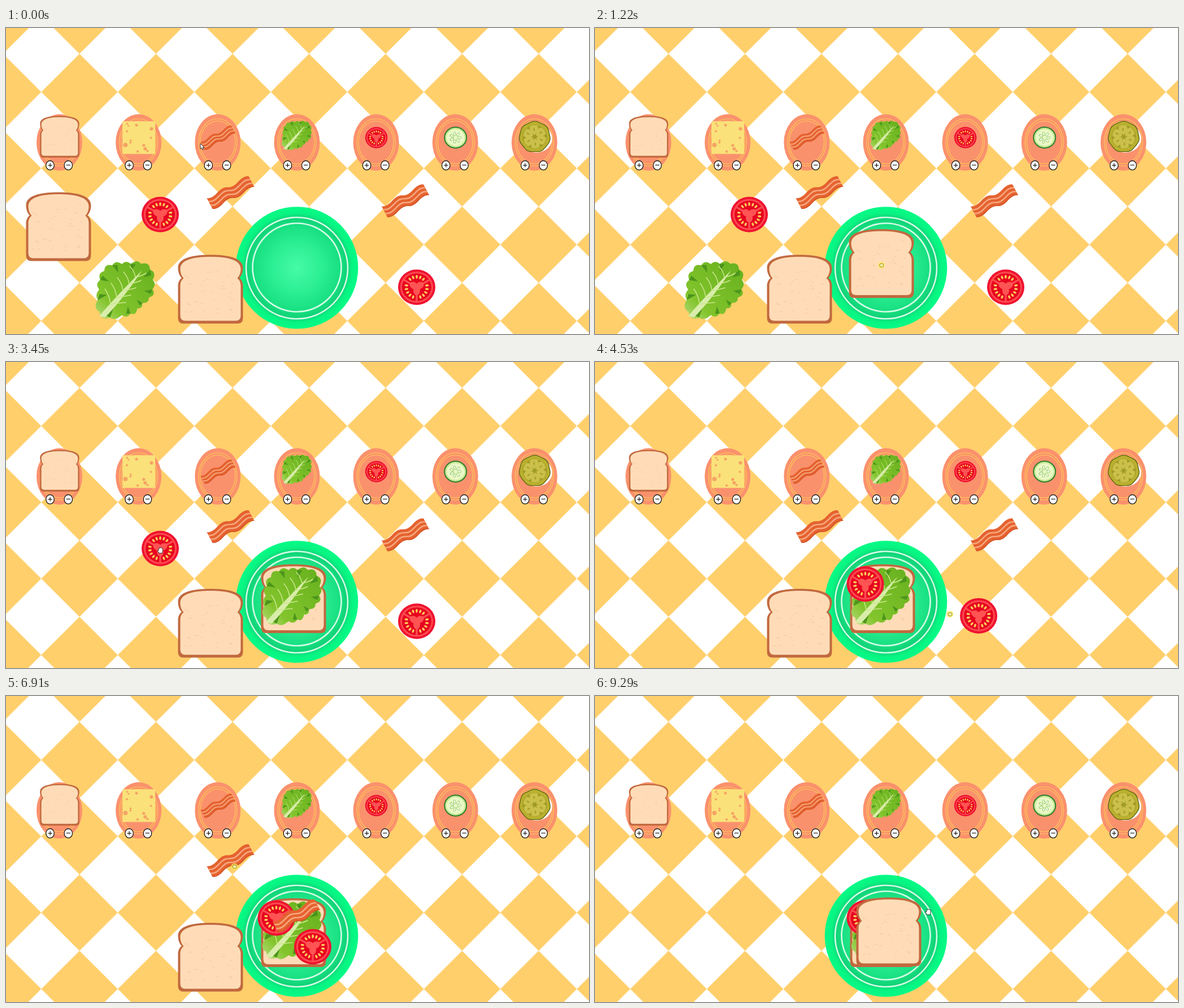
An HTML page for the animation above (9.49 s loop, 1032 by 543 pixels).

```html
<!DOCTYPE html>
<html lang="en">
<head>
<meta charset="utf-8">
<title>Build a sandwich</title>
<style>
html, body { margin: 0; height: 100%; overflow: hidden; background: #fff; }
svg { display: block; width: 100%; height: 100%; }
text { font: 15px "Liberation Sans", Arial, sans-serif; text-anchor: middle; }
</style>
</head>
<body>
<svg viewBox="0 0 1032 543">
  <defs>
    <pattern id="tiles" x="62.4" y="45.8" width="135.45" height="135.45" patternUnits="userSpaceOnUse">
      <path d="M67.725 0L135.45 67.725L67.725 135.45L0 67.725Z" fill="#ffcf6b"/>
    </pattern>
    <radialGradient id="glaze">
      <stop offset="0" stop-color="#46fba6"/>
      <stop offset=".45" stop-color="#29ed91"/>
      <stop offset=".72" stop-color="#17df80"/>
      <stop offset=".82" stop-color="#10d277"/>
      <stop offset=".9" stop-color="#08f482"/>
      <stop offset="1" stop-color="#06fb86"/>
    </radialGradient>
    <linearGradient id="leaf" x1="0" y1="1" x2="1" y2="0">
      <stop offset="0" stop-color="#b5dc7c"/>
      <stop offset=".25" stop-color="#82c42c"/>
      <stop offset="1" stop-color="#66b01e"/>
    </linearGradient>
    <g id="bread"></g>
    <g id="cheese"></g>
    <g id="bacon"></g>
    <g id="lettuce"></g>
    <g id="tomato"></g>
    <g id="cucumber"></g>
    <g id="pickle"></g>
  </defs>
  <rect width="1032" height="543" fill="url(#tiles)"/>
  <g id="tray"></g>
  <g fill="none" stroke="#d3fbe6" stroke-width="2.6">
    <circle cx="515" cy="425.5" r="108.3" fill="url(#glaze)" stroke="none"/>
    <circle cx="515" cy="426" r="90"/>
    <circle cx="515" cy="425" r="78.5"/>
  </g>
  <g id="food"></g>
  <g id="cursor">
    <path id="arrow" d="M0 0V9.5L2.3 7.5L4 11L5.6 10.2L4 7H7Z" fill="#fff" stroke="#222" stroke-width=".9"/>
    <path id="hand" d="M-2.5 5L-5 1Q-5-1-3 0L-3.5-3Q-2.5-4.5-1.5-3Q-1-5.5.5-4.5Q2-5.5 2.5-3.5Q4.5-4 4.3-1L3.5 5Z" fill="#fff" stroke="#222" stroke-width=".9"/>
    <g id="fist">
      <circle r="6" fill="#ffee58" opacity=".75"/>
      <rect x="-3" y="-2.7" width="6.5" height="5.6" rx="2" fill="#fff8b0" stroke="#8d7c1c"/>
    </g>
  </g>
</svg>
<script>
const $ = id => document.getElementById(id);
const { PI, sin, cos, abs, min, max, floor, hypot } = Math;
const range = (n, f) => Array.from({ length: n }, (_, i) => f(i));
const repeat = (n, f) => range(n, f).join('');
const polygon = (points, attrs) => `<polygon points="${points.map(p => p.map(v => v.toFixed(1)))}" ${attrs}/>`;
const ellipse = (x, y, rx, ry, attrs) => `<ellipse cx="${x}" cy="${y}" rx="${rx}" ry="${ry}" ${attrs}/>`;
const path = (d, attrs) => `<path d="${d}" ${attrs}/>`;
const line = (d, color, width) => path(d, `fill="none" stroke="${color}" stroke-width="${width}" stroke-linecap="round"`);
const turned = (deg, body) => `<g transform="rotate(${deg})">${body}</g>`;

let seed = 7;
const rnd = (a, b) => {
  seed = seed * 16807 % 2147483647;
  return a + (b - a) * seed / 2147483647;
};

// Bread: the crumb is the crust outline, slightly smaller
const slice = 'M-51-20C-55-24-57.5-30-57.5-38C-57.5-56-30-61 0-61S57.5-56 57.5-38C57.5-30 55-24 51-20' +
  'C55-17 57.5-12 57.5-6V51Q57.5 61 48 61H-48Q-57.5 61-57.5 51V-6C-57.5-12-55-17-51-20Z';
$('bread').innerHTML = path(slice, 'fill="#c1693f"') +
  path(slice, 'fill="#ffdcb7" transform="translate(0 -.8) scale(.93)"') +
  repeat(34, () => line(`M${rnd(-46, 44)} ${rnd(-46, 48)}q${rnd(-1, 3)} ${rnd(-3, 1)} ${rnd(2, 5)} ${rnd(-2, 3)}`, '#f3c79b', 1));

$('cheese').innerHTML = '<rect x="-29" y="-29" width="58" height="58" fill="#fae179"/>' +
  repeat(13, () => {
    const r = rnd(1.5, 4);
    return ellipse(rnd(-25, 25), rnd(-25, 25), r, r, 'fill="#f4a365"');
  });

// Bacon: one wavy edge, moved across the strip by k
const wave = k => range(25, i => {
  const u = i / 24;
  return [-42 + 74 * u + 10 * k, 10 - 39 * u + 3 * sin(4 * PI * u) + 19 * k];
});
const rasher = (a, b, color) => polygon([...wave(a), ...wave(b).reverse()], `fill="${color}"`);
$('bacon').innerHTML = rasher(0, 1, '#e5622f') +
  rasher(.25, .38, '#f7a67d') + rasher(.6, .73, '#f7a67d') + rasher(.94, 1, '#cf4f24');

// Lettuce: eight radii, blended around the leaf, with a ruffled rim
const reach = [50, 41, 48, 66, 52, 55, 49, 59];
const rim = a => {
  const k = a / PI * 4, i = floor(k), s = (1 - cos(PI * (k - i))) / 2;
  return reach[i % 8] * (1 - s) + reach[(i + 1) % 8] * s - 4 + 4 * abs(sin(9 * a));
};
const leafPoint = (a, k = 1) => [rim(a) * k * cos(a), rim(a) * k * sin(a)];
$('lettuce').innerHTML =
  polygon(range(180, i => leafPoint(i * PI / 90)), 'fill="url(#leaf)"') +
  repeat(9, i => {
    const a = (i * 2 + 10) * PI / 9 % (2 * PI);
    return polygon([leafPoint(a), leafPoint(a + .18, .9), leafPoint(a + .08, .65)], 'fill="#4c951c"');
  }) +
  path('M-48 47Q-18 12 28-34Q-6 17-38 50Z', 'fill="#d9edaa"') +
  repeat(5, i => {
    const x = -28 + 11 * i, y = 26 - 12 * i, len = 27 - 2 * i;
    return line(`M${x} ${y}q-2 ${-len * .6}-10 ${-len}M${x} ${y}q${len * .6}-2 ${len} ${-3 - i}`, '#cbe78d', 1.5);
  });

$('tomato').innerHTML =
  ellipse(0, 0, 33, 31.5, 'fill="#ef1230"') +
  ellipse(0, 0, 29, 27.5, 'fill="#ff4a50"') +
  ellipse(0, 0, 26, 24.5, 'fill="#e7051f"') +
  repeat(3, i => turned(90 + 120 * i, line('M0 0H25', '#ff4a50', 3.5) + ellipse(6, 0, 8, 6, 'fill="#ff5453"')) +
    repeat(5, j => turned(-90 + 120 * i + 20 * (j - 2), ellipse(18.5, 0, 3.2, 1.8, 'fill="#fbc95e"'))));

$('cucumber').innerHTML =
  ellipse(0, 0, 19.5, 18.5, 'fill="#c4e98f" stroke="#2f7d33" stroke-width="2"') +
  ellipse(0, 0, 16, 15, 'fill="#eaf8c8"') +
  repeat(7, i => turned(i * 360 / 7, ellipse(7, 0, 3.4, 1.7, 'fill="#fff" stroke="#86c552" stroke-width=".9"')));

$('pickle').innerHTML =
  ellipse(3, 3, 28, 25, 'fill="#fff"') +
  polygon(range(72, i => {
    const a = i * PI / 36, r = 27 + .6 * sin(7 * a);
    return [r * cos(a), r * sin(a)];
  }), 'fill="#b9b02f" stroke="#626713" stroke-width="1.4"') +
  ellipse(0, 0, 21.5, 20.5, 'fill="#a09b26"') +
  repeat(6, i => turned(i * 60 + 25,
    path('M3 0Q10-10 19-7Q22 0 19 7Q10 10 3 0Z', 'fill="#cbc04a"') + ellipse(13, 0, 3, 1.4, 'fill="#a8a22c"')));

// Tray: name, scale, lift
const samples = [['bread', .605, 10], ['cheese', 1, 8.5], ['bacon', .74, 8.5], ['lettuce', .51, 13],
  ['tomato', .6, 8.5], ['cucumber', 1, 8.5], ['pickle', 1, 10]];
const ring = (rx, ry) => ellipse(0, 0, rx, ry, 'fill="none" stroke="#ffcb58" stroke-width="1.1"');
const button = (x, sign) =>
  ellipse(x, 40.7, 7.2, 8.2, 'fill="#fff" stroke="#111" stroke-width="1.3"') + `<text x="${x}" y="45.4">${sign}</text>`;
$('tray').innerHTML = samples.map(([name, k, lift], i) =>
  `<g transform="translate(${94.5 + 140.15 * i} 203)">` +
  ellipse(0, 0, 40.5, 50, 'fill="#fa916d"') + ring(34, 42) + ring(31, 38) +
  `<use href="#${name}" transform="translate(.5 ${-lift}) scale(${k})"/>` +
  button(-16.5, '+') + button(15.8, '−') + '</g>').join('');

// Name, resting place, then drags: start, end, x, y
const items = [
  ['bread', 93, 352.5, [525, 1150, 507, 418], [1540, 1610, 509, 420]],
  ['lettuce', 213, 464, [2294, 2750, 508, 414.5]],
  ['tomato', 273, 331, [3500, 3930, 478.5, 394]],
  ['tomato', 727, 460, [4338, 4706, 543, 445]],
  ['bacon', 707, 306.5, [5380, 5750, 456, 400], [5840, 6100, 514, 390]],
  ['bacon', 397.5, 292, [6850, 7250, 508, 443]],
  ['bread', 362, 463.5, [7694, 8126, 524, 417.5], [8600, 8700, 520, 418.5]]
].map(([name, x, y, ...drags]) => {
  const el = document.createElementNS('http://www.w3.org/2000/svg', 'use');
  el.setAttribute('href', '#' + name);
  return { el, x, y, drags, grab: drags[0][0], drop: drags.at(-1)[1] };
});

const LOOP = 9490, LAG = 70, GRIP = 3;

// The pointer reaches each piece just before its grab, then carries it
const moves = [];
let free = 140;
for (const { x, y, drags, grab, drop } of items) {
  moves.push([max(free, grab - 460), grab - 40, x, y, 0], ...drags.map(d => [...d, .04]));
  free = drop + 20;
}
moves.push([8870, 9270, 590, 380, 0]);

function pointer(t) {
  let x = 344, y = 205 - GRIP;
  for (const [from, to, tx, ty, lift] of moves) {
    if (t <= from) break;
    const u = min(1, (t - from) / (to - from)), s = u * u * (3 - 2 * u);
    const arc = lift * hypot(tx - x, ty - y) * 4 * s * (1 - s);
    x += (tx - x) * s;
    y += (ty - y) * s - arc;
  }
  return [x, y + GRIP];
}

const place = (el, x, y) => el.setAttribute('transform', `translate(${x.toFixed(2)} ${y.toFixed(2)})`);

function draw(now) {
  const t = now % LOOP, [px, py] = pointer(t);
  let held = false, near = false;
  for (const { el, grab, drop } of items) {
    const [x, y] = pointer(max(grab, min(drop, t - LAG)));
    place(el, x, y - GRIP);
    held ||= t >= grab && t < drop;
    near ||= hypot(px - x, py - y) < 80;
  }
  // Grabbed pieces rise above the ones still waiting
  const order = [...items.filter(i => t < i.grab), ...items.filter(i => t >= i.grab)];
  $('food').append(...order.map(i => i.el));
  place($('cursor'), px, py);
  const shape = held ? 'fist' : near ? 'hand' : 'arrow';
  for (const id of ['arrow', 'hand', 'fist']) $(id).style.display = id === shape ? '' : 'none';
}

const start = performance.now();
function tick() {
  draw(performance.now() - start);
  requestAnimationFrame(tick);
}
tick();
</script>
</body>
</html>
```
